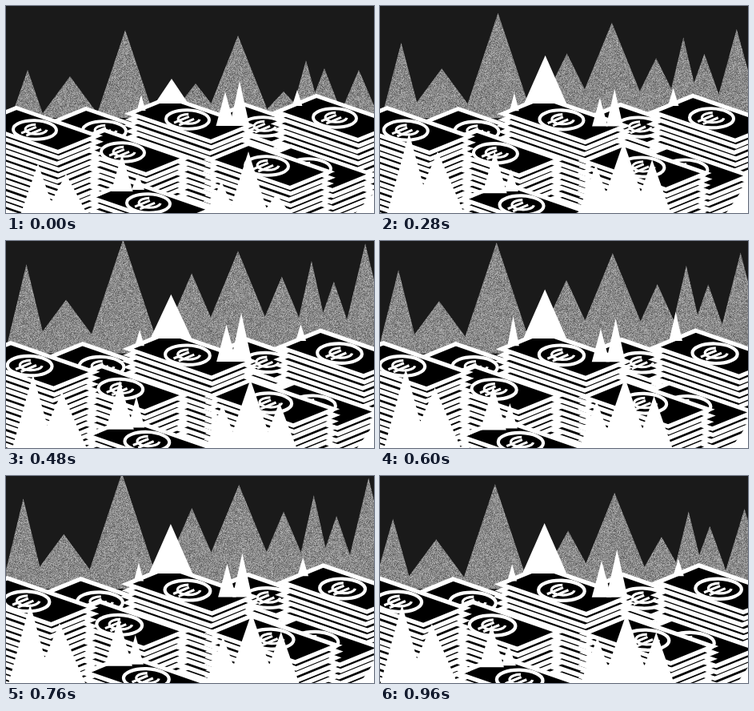
Write an HTML page with a canvas that moves like this. It is 460x259 px and loops after 1000 ms.

```html
<!DOCTYPE html>
<html lang="en">
<head>
<meta charset="utf-8">
<title>Money mountains</title>
<style>
  html, body { margin: 0; width: 100%; height: 100%; overflow: hidden; background: #1a1a1a; }
  canvas { display: block; width: 460px; height: 259px; }
</style>
</head>
<body>
<canvas id="stage" width="460" height="259"></canvas>
<script>
const ctx = document.getElementById('stage').getContext('2d');
const LOOP = 1000, STEP = 40;
const CX = 228, CY = 122;

// Bounce between 0 and 1; a higher power stays up longer
const bounce = (t, period, power, start = 0) =>
  1 - Math.abs(Math.cos(Math.PI * (t - start) / period)) ** (2 * power);

const rhythm = {
  grey: t => bounce(t, LOOP / 3, 4.3),
  slow: t => bounce(t, 430, 12),
  spike: t => bounce(t, 240, 0.5),
  twin: t => bounce(t, 400, 1.5, 280),
  small: t => bounce(t, LOOP / 3, 2)
};

// Peaks grow in height and width from a fixed base line
function peak(x, y, rise, half, base, k, lean = 0) {
  const w = half * (0.8 + 0.2 * k), px = x + lean * k;
  ctx.beginPath();
  ctx.moveTo(px - w, base);
  ctx.lineTo(px, y - rise * k);
  ctx.lineTo(px + w, base);
  ctx.fill();
}

let seed = 7;
const random = () => (seed = seed * 16807 % 2147483647) / 2147483647;

function makeGrain(size) {
  const tile = document.createElement('canvas');
  tile.width = tile.height = size;
  const c = tile.getContext('2d'), img = c.createImageData(size, size);
  for (let i = 0; i < img.data.length; i += 4) {
    const v = 138 + (random() + random() - 1) * 55;
    img.data.fill(v, i, i + 3);
    img.data[i + 3] = 255;
  }
  c.putImageData(img, 0, 0);
  return ctx.createPattern(tile, 'repeat');
}
const grain = makeGrain(256);

function greyRange(t, zoom) {
  const k = rhythm.grey(t), n = t / STEP;
  // Undo the zoom so that the grain stays on whole pixels
  grain.setTransform(new DOMMatrix()
    .translate(CX, CY).scale(1 / zoom).translate(n * 67 % 256 - CX, n * 113 % 256 - CY));
  ctx.fillStyle = grain;
  ctx.imageSmoothingEnabled = false;
  peak(27, 80, 48, 26, 140, k, 5);
  peak(80, 88, 13, 48, 140, k);
  peak(149, 30, 28, 46, 140, k);
  peak(237, 97, 54, 42, 140, k, -5);
  peak(290, 37, 21, 51, 140, k, -2);
  peak(347, 107, 60, 39, 140, k, -6);
  peak(375, 68, 40, 25, 140, k, 2);
  peak(398, 78, 25, 30, 140, k, 6);
  peak(441, 80, 73, 32, 140, k, 1);
}

function coin(x, y) {
  ctx.strokeStyle = '#fff';
  ctx.lineWidth = 4;
  ctx.beginPath();
  ctx.ellipse(x, y, 27, 11.8, 0.03, 0, 7);
  ctx.stroke();

  ctx.save();
  ctx.translate(x, y);
  ctx.scale(27, 12);
  ctx.rotate(-0.75);
  ctx.beginPath();
  ctx.arc(0.08, 0, 0.5, 0.85, -0.85);
  for (const v of [-0.17, 0.17]) {
    ctx.moveTo(-0.7, v);
    ctx.lineTo(0.25, v);
  }
  ctx.restore();
  ctx.lineWidth = 3;
  ctx.stroke();
}

// All notes share one shape, given by their long and short edges
const long = { x: 101, y: 35 }, short = { x: -49, y: 20 }, GAP = 7.4;

function note(x, y) {
  const bx = x - (long.x + short.x) / 2, by = y - (long.y + short.y) / 2;
  ctx.beginPath();
  ctx.moveTo(bx, by);
  ctx.lineTo(bx + long.x, by + long.y);
  ctx.lineTo(bx + long.x + short.x, by + long.y + short.y);
  ctx.lineTo(bx + short.x, by + short.y);
  ctx.closePath();
  ctx.fill();
  ctx.stroke();
}

function stack(x, y) {
  ctx.fillStyle = '#000';
  ctx.strokeStyle = '#fff';
  ctx.lineWidth = 5;
  for (let n = Math.ceil((280 - y) / GAP); n >= 0; n--) {
    note(x + Math.sin(n * 2.3) * 1.2, y + n * GAP);
  }
  coin(x - 3, y);
}

function draw(t) {
  ctx.setTransform(1, 0, 0, 1, 0, 0);
  ctx.fillStyle = '#1a1a1a';
  ctx.fillRect(0, 0, 460, 259);

  // Slow push-in
  const zoom = 1 + 0.069 * t / LOOP;
  ctx.translate(CX, CY);
  ctx.scale(zoom, zoom);
  ctx.translate(-CX, -CY);

  greyRange(t, zoom);

  stack(126, 156);
  stack(325, 151);
  stack(230, 142);
  stack(414, 140);

  const slow = rhythm.slow(t), spike = rhythm.spike(t);
  const twin = rhythm.twin(t), small = rhythm.small(t);
  ctx.fillStyle = '#fff';
  peak(207, 91, 28, 26, 122, slow);
  peak(169, 111, 16, 7, 131, spike);
  peak(364, 105, 15, 8, 125, spike);
  peak(274, 115, 10, 12, 150, twin);
  peak(292, 104, 13, 13, 150, twin);

  stack(149, 183);
  stack(382, 203);
  stack(329, 200);
  stack(181, 247);
  stack(39, 155);

  ctx.fillStyle = '#fff';
  peak(145, 185, 12, 17, 232, small);
  peak(165, 210, 18, 10, 230, small);
  peak(40, 197, 39, 29, 265, slow);
  peak(75, 210, 29, 36, 265, slow);
  peak(303, 182, 13, 33, 265, slow);
  peak(269, 219, 22, 25, 265, slow);
  peak(338, 235, 44, 26, 265, slow);
  peak(464, 230, 25, 41, 265, slow);
}

function tick() {
  draw(Math.floor(performance.now() % LOOP / STEP) * STEP);
  requestAnimationFrame(tick);
}
tick();
</script>
</body>
</html>
```
